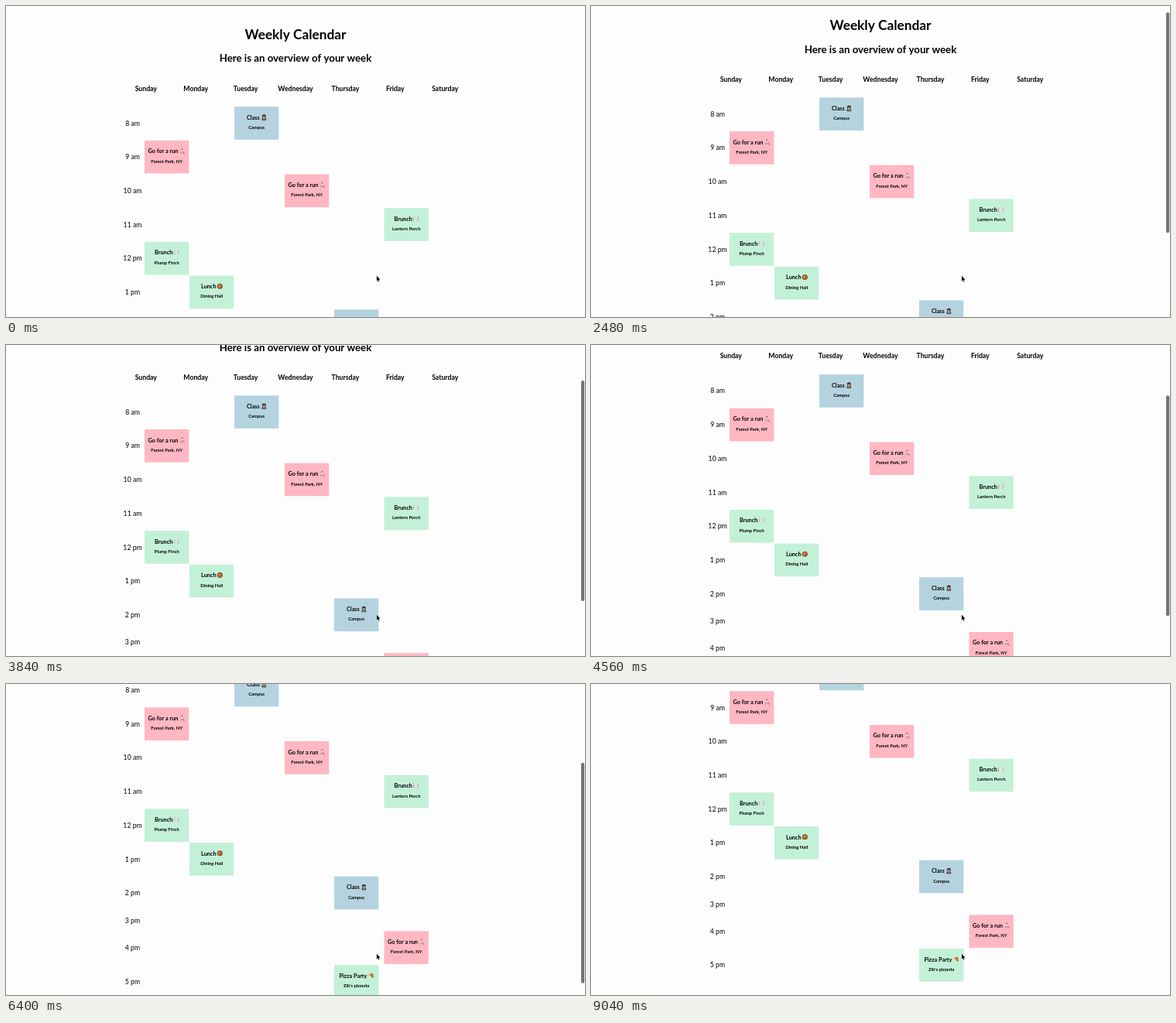
An HTML page with a canvas for the animation above (9.6 s loop, 748 by 402 pixels).

```html
<!DOCTYPE html>
<html lang="en">
<head>
<meta charset="utf-8">
<title>Weekly Calendar</title>
<style>
html, body { margin: 0; width: 100%; height: 100%; overflow: hidden; background: #fdfdfd; }
canvas { display: block; width: 748px; height: 402px; }
</style>
</head>
<body>
<canvas id="stage"></canvas>
<script>
const W = 748, H = 402, LOOP = 9600, STEP = 80;
const PAGE_H = 567, THUMB_H = 285;
const FONT = 'Lato, "Open Sans", sans-serif';
const BLUE = '#b5d3df', PINK = '#ffb7c2', GREEN = '#c3f1d8';

const canvas = document.getElementById('stage');
const ctx = canvas.getContext('2d');
const dpr = window.devicePixelRatio || 1;
canvas.width = W * dpr;
canvas.height = H * dpr;

const days = ['Sunday', 'Monday', 'Tuesday', 'Wednesday', 'Thursday', 'Friday', 'Saturday'];
const hours = ['8 am', '9 am', '10 am', '11 am', '12 pm', '1 pm', '2 pm', '3 pm', '4 pm', '5 pm'];
const cols = [179, 237, 295, 360, 424, 488.5];

// Row centres; the empty 3 pm row is shorter than the others.
const rowY = i => i < 7 ? 151.4 + 43.7 * i : [449, 484.3, 528][i - 7];

// kind: colour, title, left inset of title, icon centre, icon
const kinds = {
  study: [BLUE, 'Class', 16, 38.3, student],
  run: [PINK, 'Go for a run', 4.6, 49, runner],
  brunch: [GREEN, 'Brunch', 13, 41, plate],
  lunch: [GREEN, 'Lunch', 15, 39.3, pan],
  pizza: [GREEN, 'Pizza Party', 6.5, 47.4, slice]
};

// [column, row, kind, place]
const events = [
  [2, 0, 'study', 'Campus'],
  [0, 1, 'run', 'Forest Park, NY'],
  [3, 2, 'run', 'Forest Park, NY'],
  [5, 3, 'brunch', 'Lantern Porch'],
  [0, 4, 'brunch', 'Plump Finch'],
  [1, 5, 'lunch', 'Dining Hall'],
  [4, 6, 'study', 'Campus'],
  [5, 8, 'run', 'Forest Park, NY'],
  [4, 9, 'pizza', "Zib's pizzeria"]
];

// [time, scroll offset]: two swipes with a rest between them
const scrollKeys = [
  [0, 0], [1600, 0], [1680, 1.1], [1840, 2.2], [2000, 2.8], [3040, 29.8], [3840, 64.8],
  [4640, 92.5], [5040, 92.5], [5520, 115.3], [6400, 143.5], [7040, 164], [7520, 164.6], [LOOP, 164.6]
];

// Monotone cubic interpolation
function curve(keys, t) {
  const rate = i => (keys[i + 1][1] - keys[i][1]) / (keys[i + 1][0] - keys[i][0]);
  const slope = i => {
    if (i === 0 || i === keys.length - 1) return 0;
    const a = rate(i - 1), b = rate(i);
    return a * b <= 0 ? 0 : 2 * a * b / (a + b);
  };
  let i = 0;
  while (i < keys.length - 2 && t >= keys[i + 1][0]) i++;
  const [t0, y0] = keys[i], [t1, y1] = keys[i + 1];
  const d = t1 - t0, u = (t - t0) / d, v = 1 - u;
  return y0 * (1 + 2 * u) * v * v + slope(i) * d * u * v * v
    + y1 * u * u * (3 - 2 * u) - slope(i + 1) * d * u * u * v;
}

function text(str, x, y, size, weight = 700, align = 'center') {
  ctx.font = `${weight} ${size}px ${FONT}`;
  ctx.textAlign = align;
  ctx.fillStyle = '#000';
  ctx.fillText(str, x, y);
}

function oval(x, y, rx, ry, fill) {
  ctx.fillStyle = fill;
  ctx.beginPath();
  ctx.ellipse(x, y, rx, ry, 0, 0, Math.PI * 2);
  ctx.fill();
}

function poly(points, fill) {
  ctx.fillStyle = fill;
  ctx.beginPath();
  points.forEach(([x, y]) => ctx.lineTo(x, y));
  ctx.closePath();
  ctx.fill();
}

function stroke(points, color, width) {
  ctx.strokeStyle = color;
  ctx.lineWidth = width;
  ctx.beginPath();
  points.forEach(([x, y]) => ctx.lineTo(x, y));
  ctx.stroke();
}

function student() {
  oval(0, -0.9, 2.4, 2.6, '#3f3331');
  oval(0, 2.6, 3.1, 1.5, '#4c4a4d');
  oval(0, -0.2, 1.4, 1.7, '#c99a78');
  poly([[-3, -2.3], [0, -3.5], [3, -2.3], [0, -1.3]], '#37363a');
  oval(0, 2.3, 0.8, 0.8, '#d9d5d3');
}

function runner() {
  oval(-0.6, -2.6, 0.9, 0.9, '#8b5a4c');
  stroke([[-2.4, 0], [-1.5, -1.2], [0.2, -1], [1.8, 0]], '#d49a8b', 0.8);
  stroke([[-0.4, -1.4], [0, 0.9]], '#eeeef2', 1.7);
  stroke([[0, 0.8], [-1, 2], [-2.6, 2.9]], '#8b6670', 0.9);
  stroke([[0, 0.8], [1.5, 1.8], [1.6, 3.1], [2.9, 3.2]], '#8b6670', 0.9);
}

function plate() {
  oval(0, 0, 2.5, 2.6, '#d9cfd7');
  oval(0, 0, 1.6, 1.7, '#eee8ed');
  stroke([[-3, -2.7], [-3, 2.9]], '#a99ba6', 0.7);
  stroke([[3, -2.7], [3, 2.9]], '#a99ba6', 0.7);
}

function pan() {
  oval(0, 0, 3.5, 3.4, '#5e3524');
  oval(0, 0, 2.7, 2.6, '#d77429');
  oval(-0.9, -0.7, 0.9, 0.8, '#e9ad52');
  oval(1, 0.8, 0.9, 0.8, '#a93523');
  oval(0.8, -1.2, 0.6, 0.5, '#678342');
}

function slice() {
  poly([[-3.2, -1.2], [1.6, -3.2], [2.7, 3.2]], '#efaa43');
  stroke([[1.3, -3.2], [2.5, -1], [2.8, 3]], '#a65a2c', 1.1);
  oval(-0.9, -1.2, 0.9, 0.8, '#c83a28');
  oval(1.1, -0.9, 0.8, 0.8, '#c83a28');
  oval(1.3, 1.3, 0.8, 0.8, '#c83a28');
}

function drawEvent([col, row, kind, place]) {
  const [color, title, inset, iconX, icon] = kinds[kind];
  const x = cols[col], y = rowY(row);
  ctx.fillStyle = color;
  ctx.fillRect(x, y - 21.3, 57.3, 42.6);
  text(title, x + inset, y - 4.8, 7.3, 700, 'left');
  text(place, x + 28.7, y + 7.5, 5.85);
  ctx.save();
  ctx.translate(x + iconX, y - 7.6);
  icon();
  ctx.restore();
}

function drawPage() {
  text('Weekly Calendar', 374, 42.6, 17.3);
  text('Here is an overview of your week', 374, 72.3, 13.25);
  days.forEach((day, i) => text(day, 180.8 + 64.4 * i, 109.5, 8.7));
  hours.forEach((hour, i) => text(hour, 163.5, rowY(i) + 3.1, 8.7, 400));
  events.forEach(drawEvent);
}

function drawThumb(scroll, t) {
  if (t < 1680 || t >= 8080) return;
  ctx.globalAlpha = Math.min(1, (8080 - t) / 480);
  ctx.fillStyle = '#737373';
  ctx.beginPath();
  ctx.roundRect(743, scroll * H / PAGE_H, 4.2, THUMB_H, 2);
  ctx.fill();
  ctx.globalAlpha = 1;
}

function drawCursor() {
  const arrow = [[0, 0], [0, 6.9], [1.5, 5.5], [2.5, 7.9], [3.5, 7.5], [2.5, 5.1], [4.5, 5]];
  ctx.save();
  ctx.translate(478.9, 348.8);
  ctx.lineJoin = 'round';
  stroke([...arrow, arrow[0]], '#fff', 1.1);
  poly(arrow, '#000');
  ctx.restore();
}

function draw() {
  const t = Math.floor(performance.now() % LOOP / STEP) * STEP;
  const scroll = curve(scrollKeys, t);
  ctx.setTransform(dpr, 0, 0, dpr, 0, 0);
  ctx.fillStyle = '#fdfdfd';
  ctx.fillRect(0, 0, W, H);
  ctx.save();
  ctx.translate(0, -scroll);
  drawPage();
  ctx.restore();
  drawThumb(scroll, t);
  drawCursor();
  requestAnimationFrame(draw);
}
draw();
</script>
</body>
</html>
```
